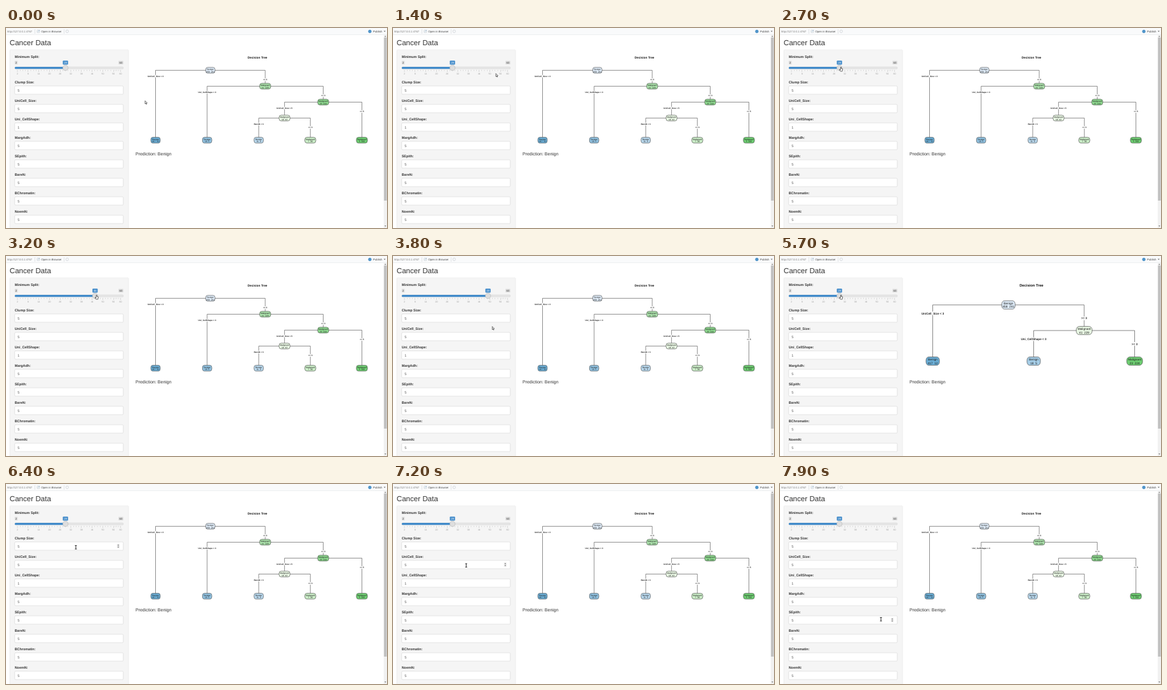
These frames come from a looping animation (600 by 314 pixels, 8 s). An HTML page with a canvas:

```html
<!DOCTYPE html>
<html lang="en">
<head>
<meta charset="utf-8">
<title>Cancer Data</title>
<style>
html, body { margin: 0; width: 100%; height: 100%; overflow: hidden; background: #fff; }
canvas { display: block; width: 600px; height: 314px; }
</style>
</head>
<body>
<canvas id="stage"></canvas>
<script>
const LOOP = 8000;
const SANS = '"Liberation Sans", Arial, sans-serif';
const canvas = document.getElementById('stage');
const ctx = canvas.getContext('2d');
const ratio = window.devicePixelRatio || 1;
canvas.width = 600 * ratio;
canvas.height = 314 * ratio;
ctx.textRendering = 'geometricPrecision';

const FIELDS = ['Clump Size:', 'UniCell_Size:', 'Uni_CellShape:', 'MargAdh:',
  'SEpith:', 'BareN:', 'BChromatin:', 'NoemN:'];
const fieldY = i => 97.5 + i * 29;
const knobX = value => 18 + (value - 2) * 2.8;
const GRIP = { low: [knobX(29) + 1.9, 61.5], high: [knobX(49) + 1.9, 61.5] };

// Pointer moves: start, end, where it stops
const MOVES = [
  [100, 500, 371.5, 172.5],
  [800, 1200, 162, 71.5],
  [1400, 2200, ...GRIP.low],
  [2700, 3300, ...GRIP.high],
  [3400, 3800, 156.3, 110.7],
  [4100, 4700, 160, 67.7],
  [4700, 4900, ...GRIP.high],
  [5000, 5600, ...GRIP.low],
  [5900, 6400, 110, 99.3],
  [6800, 7600, 120.5, 156.3],
  [7600, 7900, 159, 212.3]
];

const mix = (a, b, k) => a + (b - a) * k;
const ramp = (t, from, to) => Math.max(0, Math.min(1, (t - from) / (to - from)));

function pointerAt(t) {
  let x = 219, y = 114.3;
  for (const [from, to, endX, endY] of MOVES) {
    const k = ramp(t, from, to);
    x = mix(x, endX, k);
    y = mix(y, endY, k);
  }
  return [x, y];
}

const splitAt = t => 29 + 20 * (ramp(t, 2700, 3300) - ramp(t, 5000, 5600));

// Decision trees: counts of benign and malignant cases add up from the leaves
const leaf = (b, m) => ({ b, m });
const fork = (name, cut, left, right) =>
  ({ name, cut, left, right, b: left.b + right.b, m: left.m + right.m });
const grow = spread => fork('UniCell_Size', 3, leaf(417, 12),
  fork('Uni_CellShape', 3, leaf(18, 5), spread));

const deep = layout(
  grow(fork('UniCell_Size', 5, fork('BareN', 3, leaf(11, 4), leaf(7, 38)), leaf(5, 182))),
  { left: 235.5, gap: 81.25, top: 66.4, step: 25, bottom: 176.1, scale: 1, title: 4.75 });
const shallow = layout(
  grow(leaf(23, 224)),
  { left: 240.5, gap: 159, top: 76.8, step: 40.2, bottom: 165, scale: 1.43, title: 5.8 });

function layout(root, look) {
  const nodes = [];
  let leaves = 0;
  (function place(node, depth) {
    nodes.push(node);
    if (node.left) {
      place(node.left, depth + 1);
      place(node.right, depth + 1);
      node.x = (node.left.x + node.right.x) / 2;
      node.y = look.top + depth * look.step;
    } else {
      node.x = look.left + look.gap * leaves++;
      node.y = look.bottom;
    }
    node.benign = node.b > node.m;
    node.purity = Math.max(node.b, node.m) / (node.b + node.m);
  })(root, 0);
  // Shade by rank of purity within each class
  for (const node of nodes) {
    const peers = nodes.filter(n => n.benign === node.benign);
    const rank = peers.filter(n => n.purity < node.purity).length / (peers.length - 1);
    const [pale, full] = node.benign
      ? [[222, 235, 247], [107, 174, 214]]
      : [[232, 246, 227], [110, 206, 114]];
    node.fill = `rgb(${pale.map((v, i) => mix(v, full[i], rank))})`;
  }
  return { nodes, ...look };
}

function text(str, x, y, size, color, align = 'left', weight = 'normal') {
  ctx.font = `${weight} ${size}px ${SANS}`;
  ctx.fillStyle = color;
  ctx.textAlign = align;
  ctx.fillText(str, x, y);
}

function rect(x, y, w, h, color) {
  ctx.fillStyle = color;
  ctx.fillRect(x, y, w, h);
}

function box(x, y, w, h, r, fill, stroke, lw = 0.5) {
  ctx.beginPath();
  ctx.roundRect(x, y, w, h, r);
  ctx.fillStyle = fill;
  ctx.fill();
  if (!stroke) return;
  ctx.strokeStyle = stroke;
  ctx.lineWidth = lw;
  ctx.stroke();
}

function disc(x, y, r, fill, stroke) {
  box(x - r, y - r, 2 * r, 2 * r, r, fill, stroke);
}

function line(points, color, lw) {
  ctx.beginPath();
  points.forEach(([x, y]) => ctx.lineTo(x, y));
  ctx.strokeStyle = color;
  ctx.lineWidth = lw;
  ctx.stroke();
}

function triangle(x, y, w, h, color) {
  ctx.beginPath();
  ctx.moveTo(x - w, y);
  ctx.lineTo(x + w, y);
  ctx.lineTo(x, y + h);
  ctx.fillStyle = color;
  ctx.fill();
}

function toolbar() {
  rect(0, 0, 600, 10.4, '#f9fafb');
  rect(0, 10.2, 600, 0.6, '#e3e6e8');
  text('http://127.0.0.1:4767', 2, 6.8, 4.27, '#777');
  rect(45, 2, 0.5, 7, '#ccd0d4');
  box(49, 3.4, 3.8, 3.6, 0.4, '#fff', '#a5b1bb');
  line([[50.2, 6], [53, 3]], '#7da5c6', 0.6);
  text('Open in Browser', 55.5, 6.9, 4.3, '#444');
  rect(91.5, 2, 0.5, 7, '#ccd0d4');
  disc(96.3, 5.2, 2.1, '#f9fafb', '#b5bbc0');
  disc(573, 5.3, 2.6, '#4f94c9');
  text('Publish', 578, 6.9, 4.4, '#444');
  triangle(596.3, 4.6, 1.5, 1.7, '#666');
}

function scrollbar() {
  rect(594.8, 11, 5.2, 303, '#f1f1f1');
  rect(595.2, 15, 4.4, 256, '#c1c1c1');
  triangle(597.4, 13.8, 1.3, -1.5, '#666');
  triangle(597.4, 310.2, 1.3, 1.5, '#555');
}

function badge(str, x, y, w, h, fill, color) {
  box(x - w / 2, y - h / 2, w, h, 1, fill);
  text(str, x, y + 1.5, 4.3, color, 'center');
}

function slider(value) {
  const x = knobX(value);
  text('Minimum Split:', 13.7, 46.9, 5.42, '#333', 'left', 'bold');
  badge('2', 16, 54.3, 4.8, 5.8, '#dfdfdf', '#444');
  badge('60', 180.9, 54.3, 7.8, 5.8, '#dfdfdf', '#444');
  box(13.8, 61, 171, 3.2, 1.5, '#e6e6e6', '#ccc', 0.4);
  box(13.8, 61, x - 13.8, 3.2, 1.5, '#428bca');
  for (let i = 0; i <= 40; i++) {
    const v = Math.min(2 + i * 1.5, 56) + Math.max(0, i - 36);
    const major = i % 4 === 0;
    rect(knobX(v) - 0.2, 65.8, 0.4, major ? 3.1 : 1.6, '#aaa');
    if (major) text(v, knobX(v), 72.6, 3.5, '#999', 'center');
  }
  badge(Math.round(value), x, 54.4, 8.2, 6.4, '#428bca', '#fff');
  disc(x, 62.6, 4.2, '#dedede', '#ababab');
}

function fields(hovered) {
  FIELDS.forEach((label, i) => {
    const y = fieldY(i);
    text(label, 13.7, y - 11, 5.42, '#333', 'left', 'bold');
    box(13.7, y - 6.5, 171, 13, 1.5, '#fff', '#ccc');
    text(i === 2 ? '1' : '5', 18.3, y + 2, 5.42, '#555');
    if (i !== hovered) return;
    rect(174.6, y - 3.6, 4.4, 7.2, '#f0f0f0');
    triangle(176.8, y - 0.9, 1.3, -1.5, '#555');
    triangle(176.8, y + 0.9, 1.3, 1.5, '#555');
  });
}

function ruleLabel(str, x, y, size) {
  ctx.font = `bold ${size}px ${SANS}`;
  const w = ctx.measureText(str).width + 1;
  rect(x - w / 2, y - size * 0.62, w, size * 1.24, '#fff');
  text(str, x, y + size * 0.34, size, '#222', 'center', 'bold');
}

function drawTree({ nodes, scale, title }) {
  const forks = nodes.filter(n => n.left);
  const size = 3.35 * scale, h = 9.1 * scale, lw = 0.5 + 0.1 * scale;
  text('Decision Tree', 396, 47.5, title, '#111', 'center', 'bold');
  for (const { y, left, right } of forks) {
    line([[left.x, left.y], [left.x, y], [right.x, y], [right.x, right.y]], '#444', lw);
  }
  for (const { y, left, right, name, cut } of forks) {
    ruleLabel(`${name} < ${cut}`, left.x, y + 9.4 * scale, 3.25 * scale);
    ruleLabel(`>= ${cut}`, right.x, y + 14.7 * scale, 3.25 * scale);
  }
  for (const { x, y, b, m, benign, fill } of nodes) {
    const w = size * (benign ? 4.4 : 5.2);
    const corner = { x: w * 0.2, y: h * 0.4 };
    box(x - w / 2, y - h / 2, w, h, corner, fill, '#444', lw);
    text(benign ? 'Benign' : 'Malignant', x, y - size * 0.16, size, '#1c1c1c', 'center');
    text(`${b}  ${m}`, x, y + size * 0.96, size, '#1c1c1c', 'center');
  }
}

function outline(points, x, y) {
  ctx.beginPath();
  points.forEach(([dx, dy]) => ctx.lineTo(x + dx, y + dy));
  ctx.closePath();
  ctx.fillStyle = '#fff';
  ctx.fill();
  ctx.strokeStyle = '#111';
  ctx.lineWidth = 0.6;
  ctx.stroke();
}

function pointer(x, y, kind) {
  if (kind === 'beam') {
    line([[x, y - 2.8], [x, y + 2.8]], '#111', 0.9);
    for (const end of [-2.8, 2.8]) line([[x - 1.5, y + end], [x + 1.5, y + end]], '#111', 0.8);
  } else if (kind === 'hand') {
    outline([[0, 0], [0.9, 0], [1, 2], [3.2, 2.6], [2.6, 6.4], [-0.4, 6.4], [-2, 3.5], [-0.2, 4]], x, y);
  } else {
    outline([[0, 0], [0, 4.8], [1.1, 3.8], [1.9, 5.5], [2.6, 5.2], [1.9, 3.5], [3.3, 3.4]], x, y);
  }
}

function draw(t) {
  const [x, y] = pointerAt(t);
  const split = splitAt(t);
  const hovered = x > 13.7 && x < 184.7 ? FIELDS.findIndex((_, i) => Math.abs(y - fieldY(i)) < 6.5) : -1;
  const onKnob = Math.hypot(x - knobX(split), y - 62.6) < 4.3;

  ctx.setTransform(ratio, 0, 0, ratio, 0, 0);
  rect(0, 0, 600, 314, '#fff');
  toolbar();
  scrollbar();
  text('Cancer Data', 5.8, 27.2, 11.6, '#333');
  box(6, 34.2, 187, 290, 1.6, '#f5f5f5', '#e3e3e3');
  slider(split);
  fields(hovered);
  drawTree(t >= 3900 && t < 6000 ? shallow : deep);
  text('Prediction: Benign', 204, 200.4, 6.97, '#333');
  pointer(x, y, hovered >= 0 ? 'beam' : onKnob ? 'hand' : 'arrow');
}

const start = performance.now();
function tick() {
  // The picture advances in steps of 100 ms
  const t = (performance.now() - start) % LOOP;
  draw(Math.floor(t / 100) * 100);
  requestAnimationFrame(tick);
}
tick();
</script>
</body>
</html>
```
